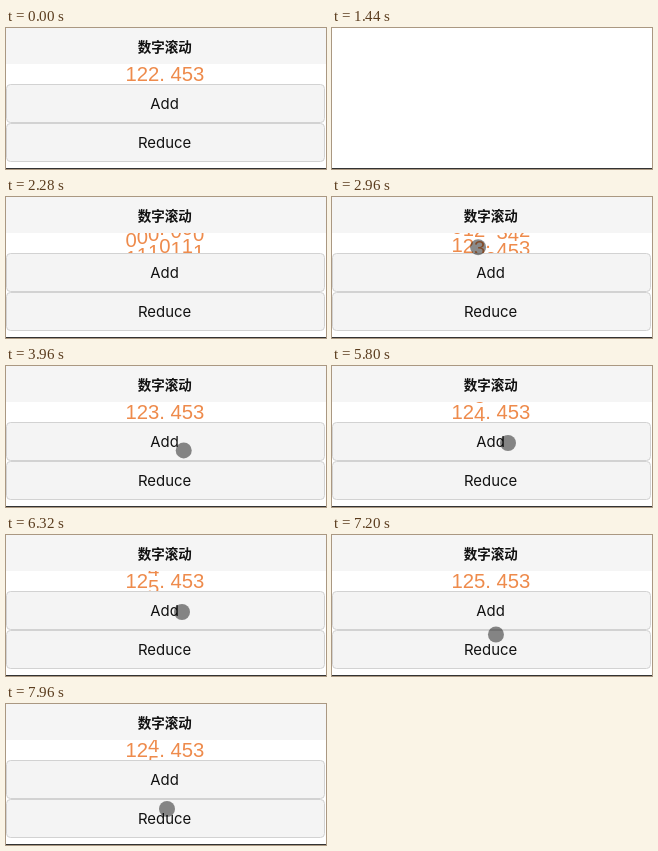
Animation, 320 px wide and 141 px high, one loop 8000 ms. Source, as an HTML page:

```html
<!DOCTYPE html>
<html lang="zh">
<head>
<meta charset="utf-8">
<style>
  html, body { margin: 0; width: 100%; height: 100%; overflow: hidden; background: #fff; }
  svg { display: block; width: 320px; height: 141px; }
  .label { font: 14.9px Inter, sans-serif; text-anchor: middle; fill: #111; }
  .title { font: bold 13.5px "Noto Sans CJK SC", "Noto Sans CJK", sans-serif; text-anchor: middle; fill: #111; }
  .digit { font: 20.3px "Liberation Sans", Arial, sans-serif; fill: #ee8b4c; }
  .button { fill: #f4f4f4; stroke: #d2d2d2; }
</style>
</head>
<body>
<svg viewBox="0 0 320 141">
  <clipPath id="window"><rect x="110" y="36" width="100" height="20"/></clipPath>
  <rect id="header" width="320" height="36" fill="#f5f5f5"/>
  <g id="app">
    <text class="title" x="158.8" y="24">数字滚动</text>
    <g id="counter" clip-path="url(#window)"></g>
    <rect class="button" x=".5" y="56.5" width="318" height="38" rx="4"/>
    <rect class="button" x=".5" y="95.5" width="318" height="38" rx="4"/>
    <text class="label" x="158.6" y="81">Add</text>
    <text class="label" x="158.6" y="120">Reduce</text>
  </g>
  <rect y="140" width="320" height="1" fill="#333"/>
  <circle id="cursor" r="8" opacity=".46"/>
</svg>
<script>
const LOOP = 8000, ROW = 17.6, COLUMN = 11.28, LEFT = 119.4, BASELINE = 53;
const ROLL = 1400, RELOAD = 1440, HEADER_BACK = 1880, APP_BACK = 2080;
const before = [1, 2, 2, -1, 4, 5, 3]; // -1 is the dot, one row above zero
const after = [1, 2, 3, -1, 4, 5, 3];
const taps = [[5070, 1], [5870, 1], [7480, -1]];
// time, x, y
const path = [
  [2900, 140, 40], [2960, 146, 50], [3120, 161, 70], [3400, 177, 85], [3920, 178, 85],
  [4360, 175, 79], [4520, 175, 79], [4800, 176, 77], [6880, 176, 77], [7280, 161, 105], [LOOP, 161, 105]
];

const byId = id => document.getElementById(id);
const clamp = v => Math.min(1, Math.max(0, v));
const easeOut = v => 1 - (1 - clamp(v)) ** 3;
const rolled = (t, start) => easeOut((t - start) / ROLL);
const show = (id, on) => byId(id).setAttribute("visibility", on ? "visible" : "hidden");

function makeColumn(target, i) {
  const rows = [..."0123456789"].map((c, n) => [c, n]);
  if (target < 0) rows.push([".", -1]);
  const x = LEFT + i * COLUMN;
  return "<g>" + rows.map(([c, n]) =>
    `<text class="digit" x="${x}" y="${BASELINE + n * ROW}">${c}</text>`).join("") + "</g>";
}
byId("counter").innerHTML = after.map(makeColumn).join("");
const columns = [...byId("counter").children];

function position(t, i) {
  if (t < RELOAD) return before[i];
  let pos = after[i] * rolled(t, 2198);
  if (i === 2) for (const [start, step] of taps) pos += step * rolled(t, start);
  return pos;
}

function moveCursor(t) {
  const visible = t >= path[0][0];
  show("cursor", visible);
  if (!visible) return;
  const k = path.findIndex(p => p[0] > t);
  const [t0, x0, y0] = path[k - 1], [t1, x1, y1] = path[k];
  const f = (t - t0) / (t1 - t0);
  byId("cursor").setAttribute("transform", `translate(${x0 + (x1 - x0) * f} ${y0 + (y1 - y0) * f})`);
}

function draw() {
  const t = performance.now() % LOOP;
  show("header", t < RELOAD || t >= HEADER_BACK);
  show("app", t < RELOAD || t >= APP_BACK);
  columns.forEach((g, i) => g.setAttribute("transform", `translate(0 ${-ROW * position(t, i)})`));
  moveCursor(t);
  requestAnimationFrame(draw);
}
draw();
</script>
</body>
</html>
```
